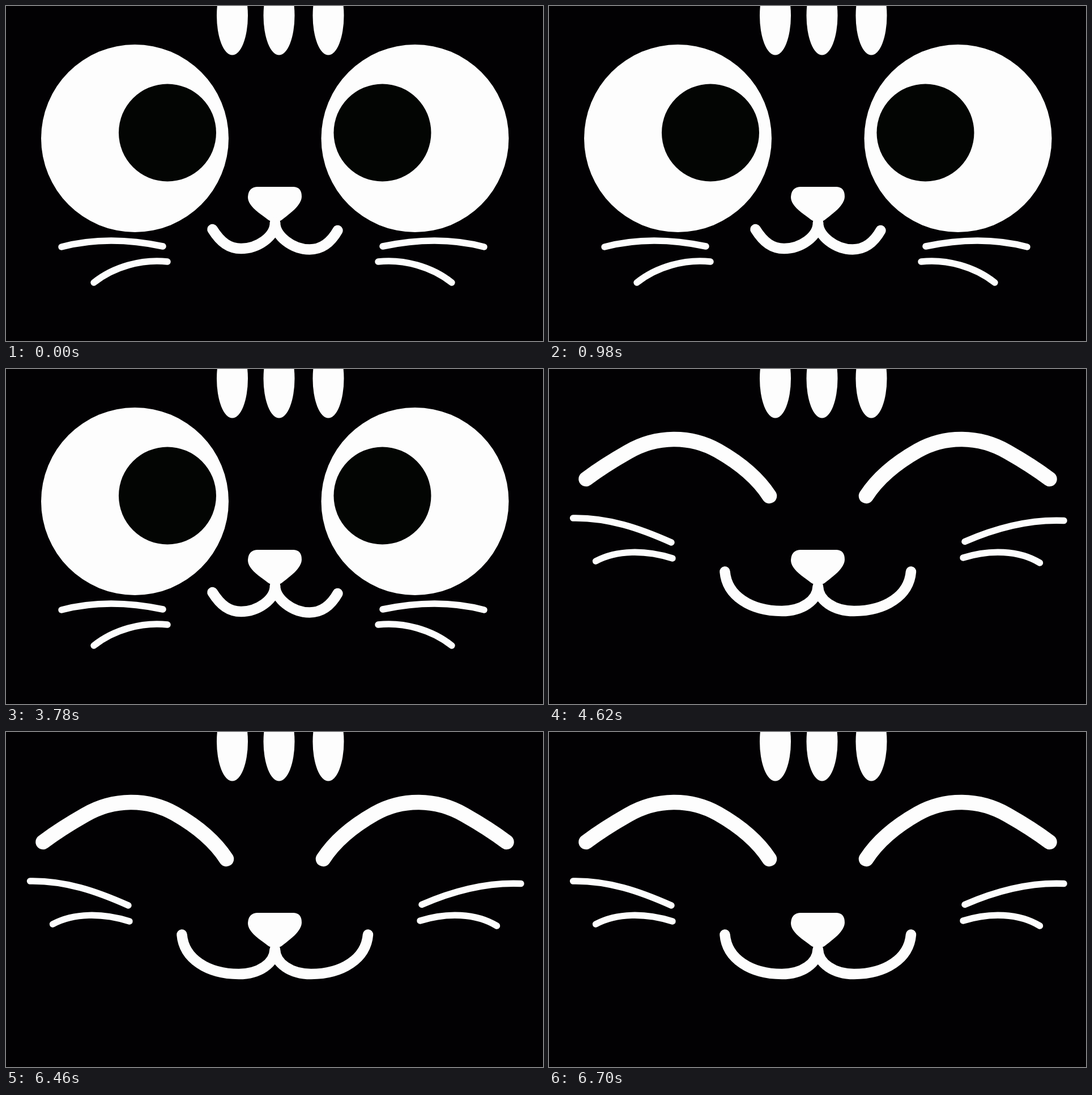
Animation, 948 px wide and 591 px high, one loop 8000 ms. Source, as an HTML page with a canvas:

```html
<!DOCTYPE html>
<html lang="en">
<head>
<meta charset="utf-8">
<title>Cat face</title>
<style>
  html, body { margin: 0; width: 100%; height: 100%; overflow: hidden; background: #020103; }
  canvas { display: block; }
</style>
</head>
<body>
<canvas id="stage" width="948" height="591"></canvas>
<script>
const ctx = document.getElementById('stage').getContext('2d');
const LOOP = 8000, SMILE_AT = 4620;
const BACK = '#020103', WHITE = '#fdfdfd', PUPIL = '#030503';

function ellipse(x, y, rx, ry, color) {
  ctx.fillStyle = color;
  ctx.beginPath();
  ctx.ellipse(x, y, rx, ry, 0, 0, Math.PI * 2);
  ctx.fill();
}

function line(path, width) {
  ctx.lineWidth = width;
  ctx.stroke(new Path2D(path));
}

// Draws once as is and once flipped; axis is the sum of mirrored x values.
function mirrored(axis, draw) {
  draw();
  ctx.save();
  ctx.translate(axis, 0);
  ctx.scale(-1, 1);
  draw();
  ctx.restore();
}

const nose = new Path2D(
  'M443 319 L508 319 Q522 320 522 336 C522 352 500 367 486 378 ' +
  'Q475 385 464 378 C450 367 427 354 427 337 Q428 320 443 319 Z');

function drawBase() {
  ctx.fillStyle = BACK;
  ctx.fillRect(0, 0, 948, 591);
  for (const x of [399.5, 482, 569]) ellipse(x, 17, 27.5, 69.5, WHITE);
  ctx.fillStyle = WHITE;
  ctx.fill(nose);
  ctx.strokeStyle = WHITE;
  ctx.lineCap = 'round';
  ctx.lineJoin = 'round';
}

function drawStare() {
  mirrored(949.5, () => {
    ellipse(227.5, 233.5, 165.5, 165.5, WHITE);
    ellipse(285, 223.5, 86, 86, PUPIL);
  });
  line('M364.5 394 C379 417 394 428 415 428 C443 428 475 408 475 382', 18.5);
  line('M475 382 C475 406 506 429.5 536 429.5 C557 429.5 573 418 585.5 396', 18.5);
  mirrored(942, () => {
    line('M98 425 C155 410 215 411 277 424', 11.5);
    line('M155 488 C190 460 240 446 285 451', 11.5);
  });
}

function drawSmile() {
  mirrored(949, () =>
    line('M65.5 194 C92 174 110 163 140 146 C190 117 250 117 298 144 C335 165 367 190 389 224', 26.5));
  mirrored(949.5, () =>
    line('M310.5 357.5 C314 400 356 427 411 427 C447 427 474 408 474.5 384', 18.5));
  line('M42.5 263 C105 262 160 281 216 306', 11.5);
  line('M82.5 339 C120 319 170 319 218 334', 11.5);
  line('M909 267.5 C850 265 790 280 734 304.5', 11.5);
  line('M866.5 342 C830 319.5 778 318 731 333', 11.5);
}

const start = performance.now();

function render() {
  const t = (performance.now() - start) % LOOP;
  drawBase();
  if (t < SMILE_AT) drawStare();
  else drawSmile();
  requestAnimationFrame(render);
}
render();
</script>
</body>
</html>
```
